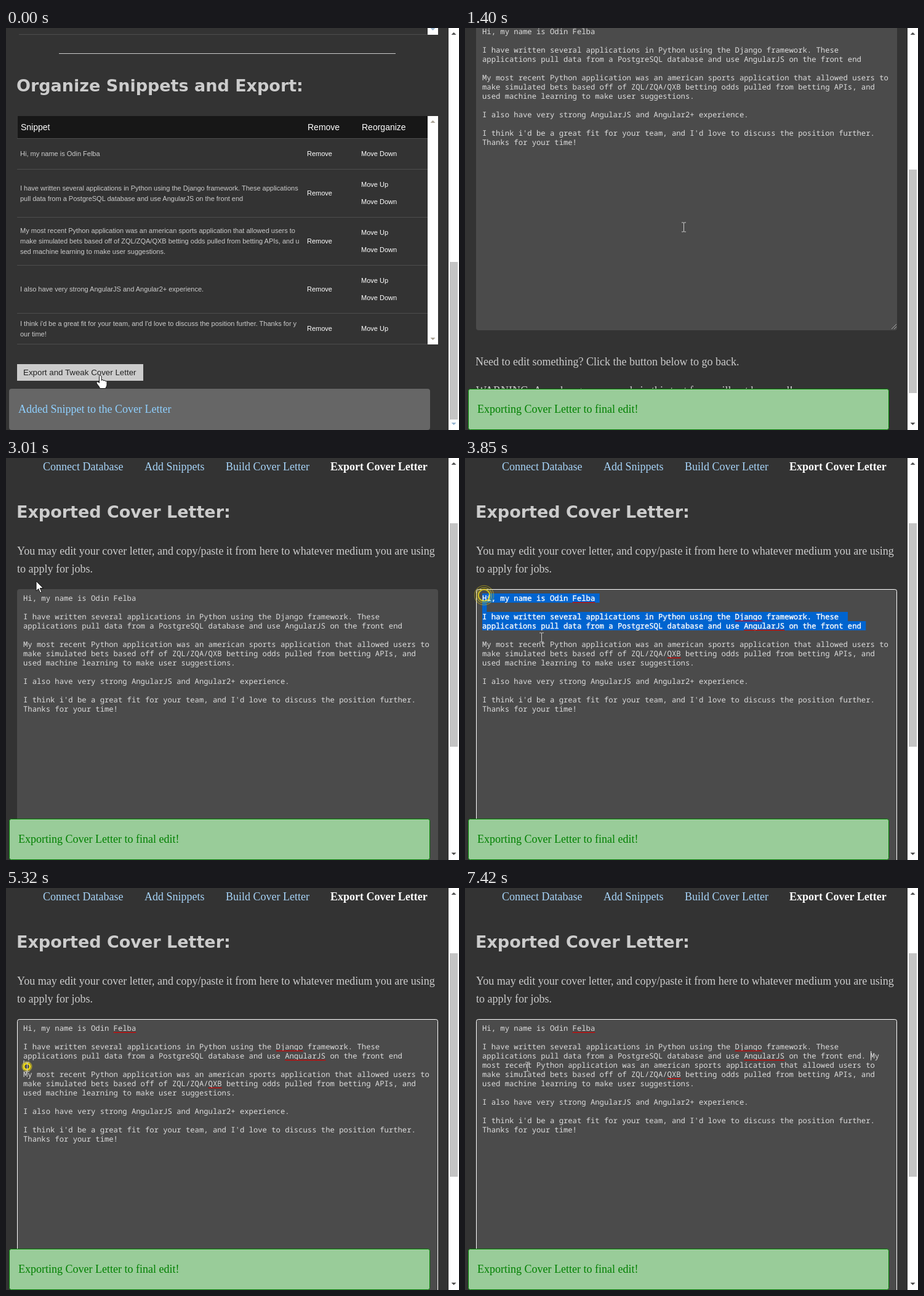
Recreate the animation shown at these times as an HTML page. Size 736 px wide and 653 px high, loop 8 s.

```html
<!DOCTYPE html>
<html lang="en">
<head>
<meta charset="utf-8">
<title>Export cover letter</title>
<style>
html, body { margin: 0; width: 100%; height: 100%; overflow: hidden; background: #333; }
svg { display: block; width: 736px; height: 653px; }
text { white-space: pre; }
.serif { font: 18px "Liberation Serif", serif; fill: #ccc; }
.head { font: bold 27px "DejaVu Sans", sans-serif; fill: #ccc; }
.th { font: 14px "Liberation Sans", sans-serif; fill: #fff; }
.td { font: 11px "Liberation Sans", sans-serif; fill: #ccc; }
.act { font: 11px "Liberation Sans", sans-serif; fill: #fff; }
.btn { font: 13.33px "Liberation Sans", sans-serif; fill: #222; }
.mono { font: 12.22px "Noto Sans Mono", monospace; fill: #ddd; text-rendering: geometricPrecision; }
.sel { fill: #fff; stroke: #fff; stroke-width: .35px; }
.link { fill: #a6d3f7; }
.here { fill: #fff; font-weight: bold; }
</style>
</head>
<body>
<svg id="stage" viewBox="0 0 736 653">
  <g id="build"></g>
  <g id="export"></g>
  <g id="toast"></g>
  <g id="bar"></g>
  <g id="ring"></g>
  <g id="cursor"></g>
</svg>
<script>
const LOOP = 8000, STEP = 70;
const CH = 7.333, LEFT = 28, TOP = 220, LH = 15;
const $ = id => document.getElementById(id);

function add(parent, tag, attrs = {}, str) {
  const el = document.createElementNS("http://www.w3.org/2000/svg", tag);
  for (const k in attrs) el.setAttribute(k, attrs[k]);
  if (str !== undefined) el.textContent = str;
  return parent.appendChild(el);
}
const set = (el, attrs) => { for (const k in attrs) el.setAttribute(k, attrs[k]); };
const rect = (p, x, y, width, height, fill, more) => add(p, "rect", { x, y, width, height, fill, ...more });
const text = (p, cls, x, y, str) => add(p, "text", { class: cls, x, y }, str);
const path = (p, d, more) => add(p, "path", { d, ...more });
const show = (el, on) => el.setAttribute("visibility", on ? "visible" : "hidden");
const arrow = (p, x, y, dir, fill) => path(p, `M${x - 4} ${y - 2 * dir}h8l-4 ${4 * dir}z`, { fill });

// Snippet table page
const build = $("build");
rect(build, 21, 10, 664, 1, "#4d4d4d");
rect(build, 685, 0, 17, 11, "#fff");
arrow(build, 693.5, 2, 1, "#9db8d2");
rect(build, 86, 41, 547, 1, "#ccc");
text(build, "head", 17, 103, "Organize Snippets and Export:");
rect(build, 19, 143, 666, 36, "#171717");
text(build, "th", 24, 166, "Snippet");
text(build, "th", 490, 166, "Remove");
text(build, "th", 578, 166, "Reorganize");
for (const y of [179, 229, 307, 385, 463, 513]) rect(build, 18, y, 667, 1, "#4d4d4d");
const snippets = [
  [204, "Hi, my name is Odin Felba"],
  [268, "I have written several applications in Python using the Django framework. These applications",
    "pull data from a PostgreSQL database and use AngularJS on the front end"],
  [346, "My most recent Python application was an american sports application that allowed users to",
    "make simulated bets based off of ZQL/ZQA/QXB betting odds pulled from betting APIs, and u",
    "sed machine learning to make user suggestions."],
  [424, "I also have very strong AngularJS and Angular2+ experience."],
  [488, "I think i'd be a great fit for your team, and I'd love to discuss the position further. Thanks for y",
    "our time!"]
];
snippets.forEach(([mid, ...rows], i) => {
  const y = mid + 4, last = snippets.length - 1;
  rows.forEach((s, j) => text(build, "td", 23, y + (j - (rows.length - 1) / 2) * 17, s));
  text(build, "act", 489, y, "Remove");
  const both = i > 0 && i < last;
  if (i > 0) text(build, "act", 577, both ? y - 14 : y, "Move Up");
  if (i < last) text(build, "act", 577, both ? y + 14 : y, "Move Down");
});
rect(build, 685, 143, 17, 371, "#fff");
arrow(build, 693.5, 152, -1, "#aaa396");
arrow(build, 693.5, 505, 1, "#aaa396");
rect(build, 18, 546, 205, 27, "#ccc");
text(build, "btn", 28, 564, "Export and Tweak Cover Letter");

// Exported letter page
const page = $("export");
[["Connect Database", 60], ["Add Snippets", 225], ["Build Cover Letter", 357], ["Export Cover Letter", 527]]
  .forEach(([s, x], i) => text(page, "serif " + (i < 3 ? "link" : "here"), x, 20, s));
text(page, "head", 17, 97, "Exported Cover Letter:");
text(page, "serif", 18, 157, "You may edit your cover letter, and copy/paste it from here to whatever medium you are using");
text(page, "serif", 18, 186, "to apply for jobs.");
const area = rect(page, 18.5, 213.5, 683, 499, "#4b4b4b", { rx: 3 });
path(page, "M693 711l8-8M697 711l4-4", { stroke: "#aaa", fill: "none" });
text(page, "serif", 17, 770, "Need to edit something? Click the button below to go back.");
text(page, "serif", 18, 817, "WARNING: Any changes you made in this text form will not be saved!");
rect(page, 18, 846, 216, 27, "#ccc");
text(page, "btn", 28, 864, "Go Back to Building Cover Letter");

const letter = [
  "Hi, my name is Odin Felba",
  "",
  "I have written several applications in Python using the Django framework. These ",
  "applications pull data from a PostgreSQL database and use AngularJS on the front end",
  "",
  "My most recent Python application was an american sports application that allowed users to ",
  "make simulated bets based off of ZQL/ZQA/QXB betting odds pulled from betting APIs, and ",
  "used machine learning to make user suggestions.",
  "",
  "I also have very strong AngularJS and Angular2+ experience.",
  "",
  "I think i'd be a great fit for your team, and I'd love to discuss the position further. ",
  "Thanks for your time! "
];
const lines = letter.map((_, i) => {
  const y = TOP + i * LH;
  const bg = rect(page, LEFT, y, 0, LH, "#0064cf");
  const t = text(page, "mono", LEFT, y + 12);
  return { bg, sel: add(t, "tspan", { class: "sel" }), rest: add(t, "tspan") };
});
const typos = ["Felba", "Django", "AngularJS", "QXB"].map(word =>
  ({ word, el: rect(page, 0, 0, word.length * CH, 1.2, "#d40000") }));
const caret = rect(page, 0, 0, 1, LH, "#eee");

// Toast, page scrollbar, click ring, pointer
const toast = rect($("toast"), 5.5, 586.5, 683, 66, "#666", { rx: 3 });
const note = text($("toast"), "serif", 20, 625);
rect($("bar"), 719, 0, 17, 653, "#fff");
const thumb = rect($("bar"), 721, 0, 13, 0, "#c4c4c4");
arrow($("bar"), 727.5, 9, -1, "#505050");
const down = arrow($("bar"), 727.5, 643, 1, "#505050");
const rings = [[1, .55, 1.2], [.8, .65, 1.5], [.6, 1, 2.4]].map(([k, opacity, w]) =>
  ({ k, el: add($("ring"), "circle", { fill: "none", stroke: "#f2dc12", "stroke-width": w, opacity }) }));
const pointers = {
  hand: path($("cursor"), "M-2 1.5C-2-.5 1.5-.5 1.5 1.5V8C2 6.5 5 6.5 5 8.5 5.5 7.5 8 7.5 8 9.5 8.5 8.5 10.5 9 10.5 11V15C10.5 18 8.5 18.5 8.5 21H-1C-1.5 18-6 14-6.5 12-6.5 10-4 9.5-2 12Z",
    { fill: "#fff", stroke: "#111" }),
  arrow: path($("cursor"), "M.5.5V16.5L4.3 13 7 19.3 9.5 18.2 6.8 12H12Z", { fill: "#fff", stroke: "#111" }),
  beam: path($("cursor"), "M-3.5-7.5H-1Q0-7.5 0-6.5 0-7.5 1-7.5H3.5M0-7V7M-3.5 7.5H-1Q0 7.5 0 6.5 0 7.5 1 7.5H3.5",
    { fill: "none", stroke: "#ccc" })
};

// Timing
const SWITCH = 770, FOCUS = 3570, UNSELECT = 5320;
const moves = [
  [0, 153, 564, "hand"], [560, 153, 564], [630, 147, 564], [770, 147, 564], [840, 202, 548],
  [910, 240, 490, "arrow"], [980, 290, 410, "beam"], [1190, 355, 323], [1540, 355, 323],
  [1680, 70, 143], [1750, 70, 143], [1890, 30, 110], [2100, 34, 126], [2310, 34, 128],
  [2380, 34, 128], [2730, 48, 152], [2870, 48, 160], [2940, 48, 185, "arrow"], [3010, 48, 199],
  [3080, 48, 199], [3150, 34, 219, "beam"], [3430, 34, 223], [3570, 31, 223], [3780, 90, 268],
  [4130, 260, 385], [4340, 309, 427], [4550, 309, 421], [5110, 309, 421], [5320, 34, 290],
  [5740, 34, 290], [5880, 26, 300], [6090, 26, 300], [6160, 32, 300], [6580, 32, 300],
  [6930, 70, 260], [7210, 101, 290]
];
const scrolls = [[1260, 300], [1330, 272], [1400, 222], [1470, 200], [2380, 200], [2520, 125], [2730, 0]];
const clicks = [[630, 147, 564], [FOCUS, 31, 223], [UNSELECT, 34, 290], [5950, 26, 300]];
const carets = [[UNSELECT, 4, 0], [5950, 5, 0], [6090, 4, 0], [6510, 3, 84], [7350, 3, 85], [7420, 3, 86]];

const latest = (list, t) => list.filter(k => k[0] <= t).pop();
function sample(keys, t) {
  const a = latest(keys, t) || keys[0];
  const b = keys[keys.indexOf(a) + 1];
  if (!b || t <= a[0]) return a.slice(1);
  const u = (t - a[0]) / (b[0] - a[0]);
  return a.slice(1).map((v, i) => typeof v === "number" ? v + (b[i + 1] - v) * u : v);
}

function letterAt(t) {
  const out = letter.slice();
  if (t >= 6090) out.splice(4, 1);
  if (t >= 6510) {
    out[3] += (t >= 7420 ? ". " : t >= 7350 ? "." : "") + "My";
    out[4] = out[4].slice(3);
  }
  return out;
}

function drawLetter(t, x, y) {
  const rows = letterAt(t);
  const selecting = t >= FOCUS && t < UNSELECT;
  const endRow = !selecting ? -1 : t >= 4340 ? 99 : Math.floor((y - TOP) / LH);
  const endCol = Math.max(0, Math.round((x - LEFT) / CH));
  lines.forEach(({ bg, sel, rest }, i) => {
    const s = rows[i] || "";
    const n = i < endRow ? Math.min(s.length + 1, 91) : i === endRow ? Math.min(endCol, s.length) : 0;
    bg.setAttribute("width", n * CH);
    sel.textContent = s.slice(0, n);
    rest.textContent = s.slice(n);
  });
  for (const { word, el } of typos) {
    const i = rows.findIndex(s => s.includes(word));
    set(el, { x: LEFT + rows[i].indexOf(word) * CH, y: TOP + i * LH + 14 });
    show(el, t >= FOCUS);
  }
  area.setAttribute("stroke", t >= FOCUS ? "#fff" : "#4b4b4b");
  const c = latest(carets, t);
  show(caret, c && (t - c[0]) % 1200 < 600);
  if (c) set(caret, { x: LEFT + c[2] * CH + .5, y: TOP + c[1] * LH });
}

function draw(t) {
  const exported = t >= SWITCH;
  const [x, y] = sample(moves, t);
  const [scroll] = sample(scrolls, t);
  $("build").style.display = exported ? "none" : "";
  page.style.display = exported ? "" : "none";
  page.setAttribute("transform", `translate(0 ${-Math.round(scroll)})`);
  if (exported) drawLetter(t, x, y);

  set(toast, exported ? { fill: "#9c9", stroke: "#008000" } : { fill: "#666", stroke: "#666" });
  note.textContent = exported ? "Exporting Cover Letter to final edit!" : "Added Snippet to the Cover Letter";
  note.style.fill = exported ? "#008000" : "#8fd0ff";
  set(thumb, exported ? { y: Math.round(106 + scroll * .5567), height: 363 } : { y: 380, height: 256 });
  down.setAttribute("fill", !exported || scroll === 300 ? "#94b4d0" : "#505050");

  const click = latest(clicks, t), age = click ? t - click[0] : 999;
  show($("ring"), age < 380);
  if (click) for (const { k, el } of rings) set(el, { cx: click[1], cy: click[2], r: k * (8 + age * .027) });
  $("ring").setAttribute("opacity", Math.min(1, (430 - age) / 200));

  const shape = moves.filter(m => m[3] && m[0] <= t).pop()[3];
  for (const k in pointers) show(pointers[k], k === shape);
  $("cursor").setAttribute("transform", `translate(${Math.round(x) + .5} ${Math.round(y) + .5})`);
}

const start = performance.now();
let shown = -1;
function tick() {
  const t = (performance.now() - start) % LOOP;
  const step = Math.floor(t / STEP + .001) * STEP;
  if (step !== shown) draw(shown = step);
  requestAnimationFrame(tick);
}
tick();
</script>
</body>
</html>
```
